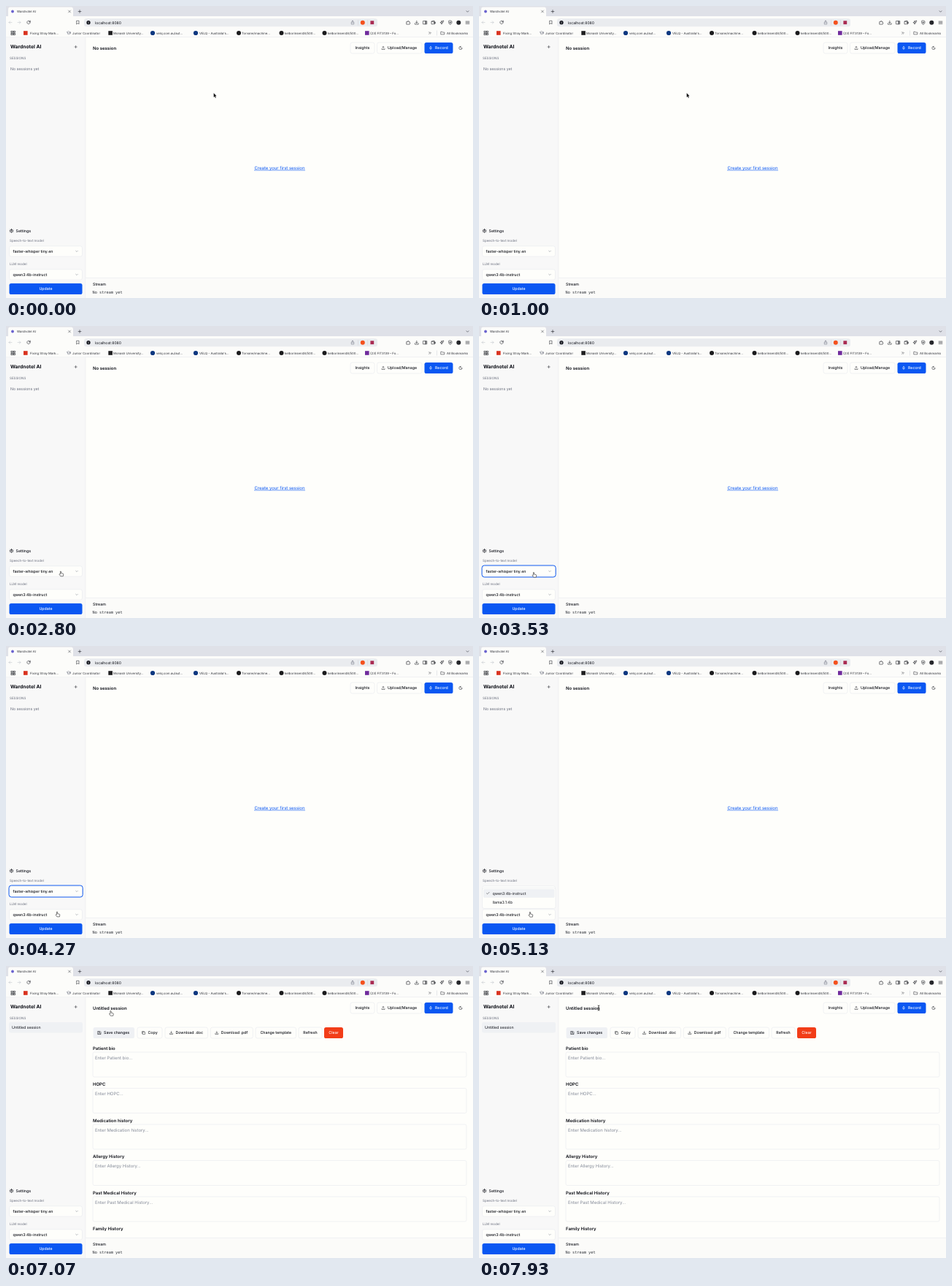
Animation, 640 px wide and 400 px high, one loop 8000 ms. Source, as an HTML page:

```html
<!DOCTYPE html>
<html lang="en">
<head>
<meta charset="utf-8">
<title>Wardnotel AI</title>
<style>
  html, body { margin: 0; width: 100%; height: 100%; overflow: hidden; background: #fefefb; }
  svg { display: block; width: 100vw; height: 100vh; }
  text { font-family: Inter, "Open Sans", sans-serif; white-space: pre; text-rendering: geometricPrecision; }
  .mono { font-family: "DejaVu Sans Mono", monospace; }
</style>
</head>
<body>
<svg id="stage" viewBox="0 0 640 400" xmlns="http://www.w3.org/2000/svg"></svg>
<script>
const LOOP = 8000, FRAME = 1000 / 15;
const INK = '#0c0e16', GREY = '#666b7a', HINT = '#848a98', FAINT = '#b9bcc4', LINE = '#e3e5ea';
const PAGE = '#fefefb', SIDE = '#f8f8f8', TINT = '#eff1f4', BAR = '#fcfcfa', BLUE = '#0a57f2';

const rect = (x, y, w, h, fill, r = 0, stroke = 'none', sw = 0.5) =>
  `<rect x="${x}" y="${y}" width="${w}" height="${h}" rx="${r}" fill="${fill}" stroke="${stroke}" stroke-width="${sw}"/>`;
const dot = (x, y, r, fill) => `<circle cx="${x}" cy="${y}" r="${r}" fill="${fill}"/>`;
const group = (id, s) => `<g id="${id}">${s}</g>`;

// y is the middle of the capitals
const text = (s, x, y, size = 5.24, o = {}) =>
  `<text x="${x}" y="${(y + size * 0.36).toFixed(2)}" font-size="${size}" fill="${o.fill || INK}"` +
  ` font-weight="${o.weight || 400}" text-anchor="${o.anchor || 'start'}" class="${o.cls || ''}">${s}</text>`;

// d is drawn on a 24-unit grid
const icon = (d, x, y, size = 6, color = INK, w = 2) =>
  `<path transform="translate(${x - size / 2} ${y - size / 2}) scale(${size / 24})" d="${d}" fill="none"` +
  ` stroke="${color}" stroke-width="${w}" stroke-linecap="round" stroke-linejoin="round"/>`;

const ICON = {
  plus: 'M5 12H19M12 5V19',
  close: 'M5 5L19 19M19 5L5 19',
  down: 'M6 9L12 15L18 9',
  check: 'M4 12L9 17L20 6',
  back: 'M20 12H4M11 5L4 12L11 19',
  forward: 'M4 12H20M13 5L20 12L13 19',
  reload: 'M20 12A8 8 0 1 1 17.5 6L20 9M20 3V9H14',
  bookmark: 'M6 3H18V21L12 16L6 21Z',
  share: 'M12 15V2M8 6L12 2L16 6M8 10H5V22H19V10H16',
  download: 'M12 3V15M7 10L12 15L17 10M3 16V21H21V16',
  upload: 'M12 15V3M7 8L12 3L17 8M3 16V21H21V16',
  puzzle: 'M4 8H9V6A2.5 2.5 0 0 1 14 6V8H19V13A2.5 2.5 0 0 1 19 18V21H4Z',
  panel: 'M3 4H21V20H3ZM13 4V20M15 8H19M15 12H19M15 16H19',
  wallet: 'M3 6H19V20H3ZM3 6L16 3V6M15 11H22V15H15Z',
  spark: 'M11 4L13 10L19 12L13 14L11 21L9 14L3 12L9 10ZM19 2V7M16.5 4.5H21.5',
  shield: 'M12 2L20 5V12C20 17 16 20 12 22C8 20 4 17 4 12V5ZM12 8V16M8 12H16',
  menu: 'M3 6H21M3 12H21M3 18H21',
  folder: 'M2 5H9L11 8H22V20H2Z',
  more: 'M5 6L11 12L5 18M13 6L19 12L13 18',
  mic: 'M12 3A3 3 0 0 1 15 6V11A3 3 0 0 1 9 11V6A3 3 0 0 1 12 3ZM5 11A7 7 0 0 0 19 11M12 18V22',
  moon: 'M12 3A6.5 6.5 0 0 0 21 12A9 9 0 1 1 12 3Z',
  copy: 'M8 8H21V21H8ZM4 16H3V3H16V4',
  save: 'M3 3H17L21 7V21H3ZM7 21V13H17V21M7 3V8H15',
  gear: 'M12 4A8 8 0 1 1 11.9 4ZM12 9A3 3 0 1 1 11.9 9ZM12 1V4M12 20V23M1 12H4M20 12H23M4 4L6.5 6.5M17.5 17.5L20 20M4 20L6.5 17.5M17.5 6.5L20 4',
  cap: 'M12 3L22 8L12 13L2 8ZM6 11V17C10 20 14 20 18 17V11M22 8V15'
};

function button(label, x, y, w, o = {}) {
  const fill = o.color || INK;
  const face = o.icon
    ? icon(ICON[o.icon], x + 8.5, y + 7.5, 5.4, fill) + text(label, x + 14.5, y + 7.5, 5.24, { weight: 500, fill })
    : text(label, x + w / 2, y + 7.5, 5.24, { weight: 500, fill, anchor: 'middle' });
  return rect(x, y, w, 15, o.bg || PAGE, 2.6, o.bg ? 'none' : LINE) + face;
}

function select(label, y) {
  return rect(4.5, y - 7.2, 100, 14.4, PAGE, 2.6, LINE) +
    text(label, 9.5, y, 5.24, { weight: 500 }) + icon(ICON.down, 97, y, 5.4, GREY);
}

const ring = (id, y) => group(id, rect(4, y - 8, 101.2, 16, 'none', 3.4, BLUE, 0.95));

function browser() {
  const small = (s, x, y = 37) => text(s, x, y, 4.3, { fill: '#2c2e36' });
  const marks = [
    ['Fixing Stray Mark...', 33], ['Junior Coordinator', 91], ['Monash University...', 147],
    ['velq.com.au/aut...', 206], ["VELQ - Australia's...", 265], ['Torvane/machine...', 323],
    ['kelborinsen48/500...', 382], ['kelborinsen48/500...', 441], ['(23) FIT3139 – Fo...', 499]
  ];
  let s = rect(0, 0, 640, 14.5, '#dfe1e8') + rect(3, 1.5, 89, 16, BAR, 3) +
    rect(0, 14, 640, 28.5, BAR) + rect(0, 42.3, 640, 0.5, LINE);
  s += dot(9, 7.5, 1.9, '#6a62cf') + small('Wardnotel AI', 15, 7.5) +
    icon(ICON.close, 87, 7.5, 5) + icon(ICON.plus, 101, 7.5, 6.5) + icon(ICON.down, 632.5, 7.5, 6);
  s += icon(ICON.back, 6, 22.5, 6, FAINT) + icon(ICON.forward, 18, 22.5, 6, FAINT) +
    icon(ICON.reload, 31, 22.5, 6.5) + icon(ICON.bookmark, 98.5, 22.5, 6);
  s += rect(107, 17.3, 402, 11, '#eaecef', 3) + dot(113, 22.7, 2.6, INK) +
    rect(112.65, 22.3, 0.7, 1.8, '#fff') + rect(112.65, 21, 0.7, 0.7, '#fff') +
    text('localhost:8080', 122, 22.7, 5.1);
  s += icon(ICON.share, 475, 22.5, 6, GREY) + rect(482, 19, 0.5, 7.5, '#cfd2d8') +
    dot(488.8, 22.7, 3, '#f4511e') + rect(495.5, 19, 0.5, 7.5, '#cfd2d8') +
    rect(499.4, 20.3, 4.8, 4.8, '#a92a52');
  ['puzzle', 'download', 'panel', 'wallet', 'spark', 'shield'].forEach((n, i) => {
    s += icon(ICON[n], 551.3 + i * 11.5, 22.7, 6.4);
  });
  s += dot(620.3, 22.7, 3, '#25262a') + icon(ICON.menu, 632.5, 22.7, 6.4);
  for (let i = 0; i < 4; i++)
    s += rect(7 + (i % 2) * 3.2, 34.3 + (i >> 1) * 3.2, 2.2, 2.2, 'none', 0, INK, 0.6);
  s += rect(24, 34.2, 5.6, 5.6, '#d9321f') + icon(ICON.cap, 86, 37, 6, GREY) +
    rect(140.3, 34.2, 5.6, 5.6, '#1d1d1f') + dot(201, 37, 3.1, '#0d3880') + dot(260, 37, 3.1, '#0d3880') +
    [319, 377.5, 436.5].map(x => dot(x, 37, 3, '#1b1b1d')).join('') +
    rect(492, 34.2, 5.6, 5.6, '#6f2a9c');
  marks.forEach(m => { s += small(...m); });
  return s + icon(ICON.more, 581, 37, 5) + rect(590, 33.5, 0.5, 7, '#cfd2d8') +
    icon(ICON.folder, 598.5, 37, 5.6) + small('All Bookmarks', 604);
}

function sidebar() {
  const tag = { fill: GREY };
  return rect(0, 42.6, 109, 357.4, SIDE) + rect(108.7, 42.6, 0.5, 357.4, LINE) +
    text('Wardnotel AI', 6, 56, 6.73, { weight: 700 }) +
    group('addHover', rect(89.3, 49.6, 12.6, 12.6, '#e9ecf2', 2.4)) + icon(ICON.plus, 95.6, 56, 5.6) +
    text('SESSIONS', 5, 71.3, 4.5, tag) +
    icon(ICON.gear, 7.5, 308, 5.8) + text('Settings', 13.5, 308, 5.24, { weight: 500 }) +
    text('Speech-to-text model', 5, 321.3, 4.5, tag) + select('faster-whisper tiny.en', 336) +
    text('LLM model', 5, 353.3, 4.5, tag) + select('qwen3:4b-instruct', 368) +
    rect(4.5, 380, 100, 15, BLUE, 2.6) +
    text('Update', 54.5, 387.6, 5.24, { weight: 500, fill: '#fff', anchor: 'middle' });
}

function header() {
  return button('Insights', 472, 50, 33) + button('Upload/Manage', 508.5, 50, 61.5, { icon: 'upload' }) +
    button('Record', 573.5, 50, 39, { icon: 'mic', bg: BLUE, color: '#fff' }) + icon(ICON.moon, 623, 57.5, 5.8);
}

function stream() {
  return rect(109.2, 372.5, 531, 28, '#fbfbf9') + rect(109.2, 372.3, 531, 0.5, LINE) +
    text('Stream', 119, 380.8, 5.24, { weight: 500 }) +
    text('No stream yet', 118.6, 391.7, 5.24, { cls: 'mono', fill: '#2c2f38' });
}

const bold = { weight: 600 };

const emptyView = () =>
  text('No session', 119, 57.5, 6, bold) + text('No sessions yet', 6, 85.8, 5.24, { fill: GREY }) +
  text('Create your first session', 375, 222, 5.98, { fill: BLUE, anchor: 'middle' }) +
  rect(340, 224.7, 70, 0.6, BLUE);

function sessionView() {
  const names = ['Patient bio', 'HOPC', 'Medication history', 'Allergy History', 'Past Medical History', 'Family History'];
  let s = text('Untitled session', 119, 57.5, 6, bold) +
    rect(4, 77, 101, 14.5, TINT, 2.4) + text('Untitled session', 8, 84.3);
  s += button('Save changes', 119.5, 84, 56.5, { icon: 'save', bg: TINT }) +
    button('Copy', 180, 84, 34, { icon: 'copy' }) +
    button('Download .doc', 218, 84, 58.5, { icon: 'download' }) +
    button('Download .pdf', 280.3, 84, 58, { icon: 'download' }) +
    button('Change template', 342, 84, 55.5) + button('Refresh', 401, 84, 32) +
    button('Clear', 436, 84, 26, { bg: '#f23d18', color: '#fff' });
  names.forEach((n, i) => {
    const y = 112.8 + i * 49.5;
    s += text(n, 119, y, 6, bold) + rect(119, y + 5.2, 512, 34, PAGE, 2, LINE) +
      text(`Enter ${n}...`, 122, y + 12.6, 5.98, { fill: HINT });
  });
  return `<g clip-path="url(#body)">${s}</g>`;
}

const popup = () =>
  rect(4.5, 331.5, 100.5, 28, PAGE, 2.4, LINE) + rect(6, 333, 97.5, 11.8, TINT, 1.6) +
  icon(ICON.check, 12.2, 338.7, 5.4) + text('qwen3:4b-instruct', 18.5, 338.7) + text('llama3.1:4b', 18.5, 350.9);

const pointers = {
  arrow: '<path d="M0 -1V5.2L1.4 4L2.4 6.2L3.4 5.8L2.5 3.6H4.3Z" fill="#000" stroke="#fff" stroke-width=".35"/>',
  hand: '<path d="M-1.6 -3.4Q-.9 -4 -.4 -3.2V-.9L2 -.4Q2.8 -.2 2.7 .7L2.3 3.2H-1.2L-3 .6Q-2.7 -.4 -1.6 .4Z" fill="#fff" stroke="#000" stroke-width=".5" stroke-linejoin="round"/>',
  beam: '<path d="M-1.3 -3.5Q0 -3.5 0 -2.6Q0 -3.5 1.3 -3.5M0 -2.6V2.6M-1.3 3.5Q0 3.5 0 2.6Q0 3.5 1.3 3.5" fill="none" stroke="#000" stroke-width=".7"/>'
};

document.getElementById('stage').innerHTML =
  '<defs><clipPath id="body"><rect width="640" height="363"/></clipPath></defs>' +
  rect(0, 0, 640, 400, PAGE) + browser() + sidebar() + header() +
  group('empty', emptyView()) + group('session', sessionView()) + stream() +
  ring('ringSpeech', 336) + ring('ringLlm', 368) + group('popup', popup()) +
  group('pointer', Object.keys(pointers).map(k => group(k, pointers[k])).join(''));

const el = id => document.getElementById(id);
const show = (id, on) => { el(id).style.display = on ? '' : 'none'; };

// pointer stops: time, x, y
const path = [
  [0, 284.5, 120], [1000, 284.5, 120], [1870, 107.5, 157.5], [2500, 76, 337], [3000, 76, 341],
  [3800, 76, 341], [4300, 71, 368], [5150, 71, 368], [5400, 62, 341], [5550, 62, 341],
  [6130, 96, 63], [6500, 96, 63], [7060, 144.5, 65], [7300, 146, 63], [7700, 164, 57.5], [8000, 164, 57.5]
];

function pointerAt(t) {
  const i = Math.max(1, path.findIndex(p => p[0] > t));
  const [a, b] = [path[i - 1], path[i]];
  const u = (t - a[0]) / (b[0] - a[0]), k = u * u * (3 - 2 * u);
  return [a[1] + (b[1] - a[1]) * k, a[2] + (b[2] - a[2]) * k];
}

function draw(t) {
  const within = (a, b) => t >= a && t < b;
  const created = t >= 6450, onAdd = within(6070, 6560);
  const [x, y] = pointerAt(t);
  const kind = t >= 7330 ? 'beam'
    : within(2430, 5600) || onAdd || t >= 6960 ? 'hand' : 'arrow';
  show('empty', !created);
  show('session', created);
  show('addHover', onAdd);
  show('ringSpeech', within(3000, 4330));
  show('popup', within(4330, 5500));
  show('ringLlm', within(5500, 6450));
  for (const k in pointers) show(k, k === kind);
  el('pointer').setAttribute('transform', `translate(${x.toFixed(2)} ${y.toFixed(2)})`);
}

const start = performance.now();
function tick() {
  const t = (performance.now() - start) % LOOP;
  draw(Math.floor(t / FRAME + 0.1) * FRAME % LOOP);
  requestAnimationFrame(tick);
}
tick();
</script>
</body>
</html>
```
